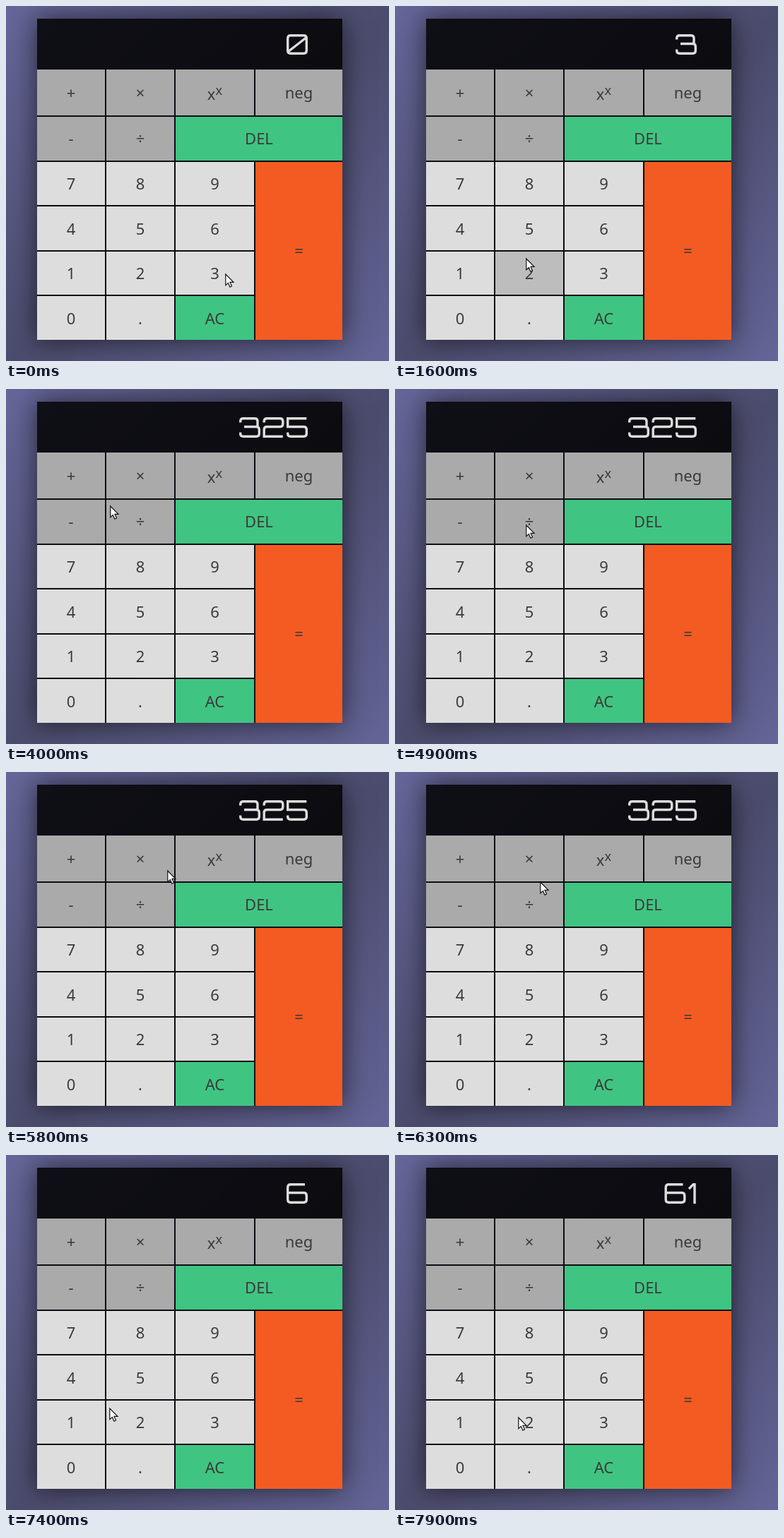
Write an HTML page that moves like this. It is 542x503 px and loops after 8 s.

```html
<!DOCTYPE html>
<html lang="en">
<head>
<meta charset="utf-8">
<title>Calculator</title>
<style>
  html, body { margin: 0; width: 100%; height: 100%; overflow: hidden; }
  body { position: relative; background: linear-gradient(to bottom right, #66669a, #4b4b6c 52%, #646497); }
  #calc {
    position: absolute; left: 44px; top: 18px; width: 432px; height: 455px;
    background: rgba(0, 0, 0, .85); box-shadow: 0 0 34px rgba(0, 0, 0, .6);
  }
  svg { position: absolute; left: 0; top: 0; }
  text { font: 22px "Noto Sans", "Open Sans", sans-serif; fill: #3a3a3a; text-anchor: middle; }
  .sup { font-size: 18.33px; }
  #display { fill: none; stroke: #ddd; stroke-width: 3.4; }
</style>
</head>
<body>
<div id="calc"></div>
<svg width="542" height="503" viewBox="0 0 542 503">
  <g id="keys"></g>
  <g id="display"></g>
  <path id="cursor" d="M.8 1V16.6L4.4 13.4L6.9 19.2L9.5 18L7 12.4H12Z" fill="#fff" stroke="#111" stroke-width="1.2"/>
</svg>
<script>
const LOOP = 8000, STEP = 100;
const $ = id => document.getElementById(id);

// Key grid: column edges, and rows of nearly equal pitch below the first
const edges = [44, 142, 240, 353, 478];
const rowTop = r => r ? Math.round(93.5 + 63.5 * r) : 90;
const rowEnd = r => r ? Math.floor(155.5 + 63.5 * r) : 155;
const OP = '#aaaaaa', NUM = '#dddddd', GREEN = '#40c482', ORANGE = '#f35b22';
const pressed = { [OP]: '#929292', [NUM]: '#bdbdbd' };
const keys = {};

function addKey(label, color, c, r, c2 = c, r2 = r) {
  const x = edges[c], y = rowTop(r), w = edges[c2 + 1] - 2 - x, h = rowEnd(r2) - y;
  const sup = label === 'xx';
  const body = sup ? 'x<tspan class="sup" dy="-7.3">x</tspan>' : label;
  const base = Math.round(y + h / 2 + 8.32 + .07 * r) + (sup ? 2 : 0);
  $('keys').insertAdjacentHTML('beforeend',
    `<rect x="${x}" y="${y}" width="${w}" height="${h}" fill="${color}"/>` +
    `<text x="${x + w / 2}" y="${base}">${body}</text>`);
  keys[label] = { rect: $('keys').lastElementChild.previousElementSibling, color };
}

['+', '×', 'xx', 'neg'].forEach((s, i) => addKey(s, OP, i, 0));
['-', '÷'].forEach((s, i) => addKey(s, OP, i, 1));
addKey('DEL', GREEN, 2, 1, 3);
[...'7894561230.'].forEach((s, i) => addKey(s, NUM, i % 3, 2 + Math.floor(i / 3)));
addKey('AC', GREEN, 2, 5);
addKey('=', ORANGE, 3, 2, 3, 5);

// Display digits: strokes through named points; capitals make sharp corners
const L = 1.7, R = 28.3, TOP = 1.7, MID = 13.5, END = 27.3;
const points = {
  a: [L, TOP], b: [R, TOP], c: [L, MID], d: [R, MID], e: [L, END], f: [R, END],
  g: [L, 21.5], h: [L, 7.5], k: [7, MID], m: [26, MID], n: [26, TOP],
  s: [2.5, 24.5], t: [27.5, 5], u: [1, 8], v: [7, TOP], w: [9, TOP], x: [9, 29]
};
const glyphs = { 0: 'cabfec st', 1: 'uVWx', 2: 'habdcEf', 3: 'hanm kdfeg', 5: 'bACdfeg', 6: 'naefdc' };

// Point at distance r from p towards q
function toward(p, q, r) {
  const k = r / Math.hypot(q[0] - p[0], q[1] - p[1]);
  return p.map((v, i) => v + (q[i] - v) * k);
}

function stroke(names) {
  const pts = [...names].map(n => points[n.toLowerCase()]);
  return pts.map((p, i) => {
    if (!i) return 'M' + p;
    if (i === pts.length - 1 || names[i] < 'a') return 'L' + p;
    return `L${toward(p, pts[i - 1], 4)}Q${p} ${toward(p, pts[i + 1], 4)}`;
  }).join('');
}

function showNumber(n) {
  let right = 427, html = '';
  for (const d of [...n].reverse()) {
    const x = right - (d === '1' ? 12 : 30);
    html += `<path d="${glyphs[d].split(' ').map(stroke).join('')}" transform="translate(${x} 40)"/>`;
    right = x - 3.5;
  }
  $('display').innerHTML = html;
}

// Key presses: down, up, key
const presses = [
  [800, 800, '3'], [1600, 1700, '2'], [2400, 2700, '5'],
  [6000, 6300, '×'], [7100, 7200, '6'], [7700, 7800, '1']
];

// A digit counts on release; the first one after an operator starts a new number
function numberAt(t) {
  let value = '0', fresh = true;
  for (const [, up, key] of presses) {
    if (up > t) break;
    if (key === '×') fresh = true;
    else {
      value = fresh ? key : value + key;
      fresh = false;
    }
  }
  return value;
}

// Pointer moves: start, end, destination; it rests in between
const moves = [
  [0, 100, 309, 379], [900, 1300, 185, 357], [1700, 2000, 190, 310], [2600, 2700, 245, 200],
  [2700, 3200, 280, 143], [3500, 4000, 147, 165], [4000, 4200, 113, 167], [4300, 4600, 145, 145],
  [4600, 4900, 185, 192], [5000, 5300, 130, 195], [5300, 5600, 304, 160], [5600, 5900, 190, 129],
  [6200, 6900, 298, 310], [7100, 7500, 95, 374], [7700, 7900, 174, 371]
];

function pointerAt(t) {
  let x = 310, y = 379;
  for (const [start, end, toX, toY] of moves) {
    const k = Math.min(1, Math.max(0, (t - start) / (end - start)));
    x += (toX - x) * k;
    y += (toY - y) * k;
  }
  return [Math.round(x), Math.round(y)];
}

let shown;
function draw(now) {
  const t = Math.floor(now % LOOP / STEP) * STEP;
  if (t !== shown) {
    shown = t;
    showNumber(numberAt(t));
    for (const { rect, color } of Object.values(keys)) rect.setAttribute('fill', color);
    for (const [down, up, label] of presses) {
      const { rect, color } = keys[label];
      if (t >= down && t < up) rect.setAttribute('fill', pressed[color]);
    }
    $('cursor').setAttribute('transform', `translate(${pointerAt(t)})`);
  }
  requestAnimationFrame(draw);
}
draw(performance.now());
</script>
</body>
</html>
```
